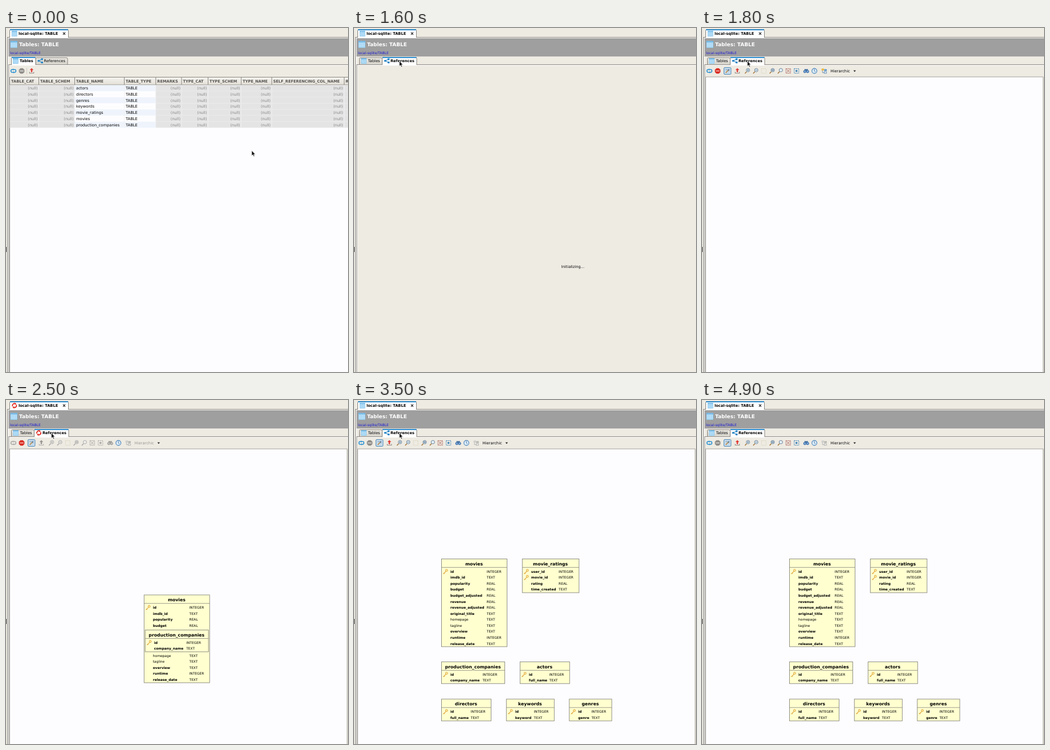
Animation of 600 by 605 pixels, one loop 5400 ms. Source, as an HTML page:

```html
<!DOCTYPE html>
<html lang="en">
<head>
<meta charset="utf-8">
<title>Table references</title>
<style>
  html, body { margin: 0; width: 100%; height: 100%; overflow: hidden; background: #eeebe3; }
  svg { display: block; width: 600px; height: 605px; }
  text { font-family: "DejaVu Sans", sans-serif; font-size: 6.75px; text-rendering: geometricPrecision; white-space: pre; }
  .b { font-weight: bold; font-size: 6.65px; }
  .off { filter: grayscale(1); opacity: .6; }
  text.off { opacity: .36; }
</style>
</head>
<body>
<svg id="stage" viewBox="0 0 600 605" xmlns="http://www.w3.org/2000/svg"></svg>
<script>
const NS = "http://www.w3.org/2000/svg";
const stage = document.getElementById("stage");
const LOOP = 5400, TICK = 100;

function add(parent, tag, attrs = {}, content) {
  const el = document.createElementNS(NS, tag);
  for (const k in attrs) el.setAttribute(k, attrs[k]);
  if (content !== undefined) el.textContent = content;
  parent.appendChild(el);
  return el;
}
const group = (parent, x = 0, y = 0) => add(parent, "g", { transform: `translate(${x} ${y})` });
const rect = (p, x, y, width, height, fill, more) => add(p, "rect", { x, y, width, height, fill, ...more });
const path = (p, d, stroke, width = 1, fill = "none") =>
  add(p, "path", { d, stroke, fill, "stroke-width": width });
const circle = (p, cx, cy, r, fill, stroke = "none", width = 1) =>
  add(p, "circle", { cx, cy, r, fill, stroke, "stroke-width": width });
const label = (p, x, y, str, more) => add(p, "text", { x, y, ...more }, str);
const show = (el, on) => el.setAttribute("display", on ? "inline" : "none");
const dim = (el, on) => el.setAttribute("class", on ? "off" : "");

function gradient(id, from, to) {
  const g = add(stage, "linearGradient", { id, x1: 0, y1: 0, x2: 0, y2: 1 });
  add(g, "stop", { offset: 0, "stop-color": from });
  add(g, "stop", { offset: 1, "stop-color": to });
}
gradient("head", "#f5f3ef", "#e3dfd7");
gradient("idle", "#eceae4", "#d6d3cb");

// Icons, each drawn around its own centre

function gridIcon(p, x, y, s) {
  const g = group(p, x, y), h = s / 2;
  rect(g, -h, -h, s, s, "#c9e8fb", { stroke: "#7dbfe9", "stroke-width": .7 });
  rect(g, -h, -h, s, s * .2, "#6bb5e6");
  for (const k of [-.25, 0, .25])
    path(g, `M${k * s} ${-h}V${h}M${-h} ${k * s + .8}H${h}`, "#93cdf1", .7);
  return g;
}

function linkIcon(p, x, y) {
  const g = group(p, x, y);
  path(g, "M3 -2.8L-3 0L3 2.8", "#2484c6", 1.1);
  circle(g, -2.9, 0, 1.8, "#2484c6");
  rect(g, 1.5, -4.3, 3.4, 3, "#2484c6");
  rect(g, 1.5, 1.3, 3.4, 3, "#2484c6");
  return g;
}

function spinIcon(p, x, y) {
  const g = add(group(p, x, y), "g");
  path(g, "M-3.3 1.4A3.6 3.6 0 0 1 1.4 -3.3M3.3 -1.4A3.6 3.6 0 0 1 -1.4 3.3", "#e0281f", 1.8);
  path(g, "M.8 -5.2L3.6 -2.5L.3 -1.5ZM-.8 5.2L-3.6 2.5L-.3 1.5Z", "none", 0, "#e0281f");
  return g;
}

function refreshIcon(p, x) {
  const g = group(p, x, 75.5);
  path(g, "M-.5 -2.4H-2A2.4 2.4 0 0 0 -2 2.4H-.5M.5 -2.4H2A2.4 2.4 0 0 1 2 2.4H.5", "#2a92d2", 1.5);
  path(g, "M-1 -4.3L1.3 -2.4L-1 -.5ZM1 4.3L-1.3 2.4L1 .5Z", "none", 0, "#2a92d2");
  return g;
}

function stopIcon(p, x, fill) {
  const g = group(p, x, 75.5);
  path(g, "M-2.1 -4.8H2.1L4.8 -2.1V2.1L2.1 4.8H-2.1L-4.8 2.1V-2.1Z", "none", 0, fill);
  rect(g, -3.3, -1, 6.6, 2, "#fff", { opacity: .55 });
  return g;
}

function exportIcon(p, x) {
  const g = group(p, x, 75.5);
  path(g, "M0 -5L3.3 -1.5H1.2V2.3H-1.2V-1.5H-3.3Z", "none", 0, "#e03a34");
  path(g, "M-3.7 1.5V4H3.7V1.5", "#95908c", 1.1);
  return g;
}

function lensIcon(p, x, mark) {
  const g = group(p, x, 75.5);
  path(g, "M-1.2 1.2L-4.2 4.4", "#a5793f", 1.5);
  circle(g, 1.2, -1.4, 3, "#e4f1fa", "#6c8296", 1);
  if (mark) path(g, mark, "#506f8b", .9);
  return g;
}

function fitIcon(p, x, color, inner) {
  const g = group(p, x, 75.5);
  rect(g, -4, -4, 8, 8, "none", { stroke: color, "stroke-width": 1, "stroke-dasharray": "2 1" });
  if (inner) path(g, inner, color, .9, color);
  return g;
}

function glassesIcon(p, x) {
  const g = group(p, x, 75.5);
  path(g, "M-3 -2.5H-1L0 -1L1 -2.5H3", "#33659d", 1.5);
  circle(g, -2.4, 1, 2.2, "#7ca8d7", "#33659d", 1);
  circle(g, 2.4, 1, 2.2, "#7ca8d7", "#33659d", 1);
  return g;
}

function clockIcon(p, x) {
  const g = group(p, x, 75.5);
  circle(g, 0, 0, 4.4, "#d9ebf8", "#4a83b8", 1.1);
  path(g, "M0 -3V0L2 1.8", "#426c94", .9);
  return g;
}

function layoutIcon(p, x) {
  const g = group(p, x, 75.5);
  path(g, "M-3 -2V3H1", "#778da5", .9);
  rect(g, -4.6, -4.2, 4.4, 3.4, "#efb942");
  rect(g, 0, -3, 4.6, 3, "#5796cd");
  rect(g, 0, 1.3, 4, 3, "#e2edf7", { stroke: "#5d87ad", "stroke-width": .8 });
  return g;
}

function toggleIcon(p, x) {
  const g = group(p, x, 75.5);
  rect(g, -6.2, -6, 12.4, 12, "#c5daeb", { rx: 1.5, stroke: "#4f8aba", "stroke-width": 1 });
  path(g, "M-3.2 3.4L1.6 -1.4", "#c08b45", 1.5);
  path(g, "M.2 -2.8L3 0M1.4 -1.4L3.4 -3.4", "#66809a", 1.3);
  path(g, "M-3 -3L-1.4 -1.4", "#7d93a8", 1.1);
}

function keyIcon(p, x, y) {
  const g = group(p, x, y);
  path(g, "M.6 .2L-4 4.5M-2.6 3.2L-1.5 4.3", "#e0a53a", 1.1);
  circle(g, 1.9, -1.7, 1.9, "#fff0a8", "#e0a53a", 1);
}

// Window frame: each tab folder has a border line with a white margin inside it

const LINE = "#85827c";
function folder(p, x, y) {
  rect(p, x, y, 610, 610, "#fff", { stroke: LINE, "stroke-width": 1 });
}

const frame = group(stage);
rect(frame, 0, 0, 600, 605, "#eeebe3");
folder(frame, 2.6, 16.4);
rect(frame, 4.4, 18, 596, 32.4, "#a09f9f");
rect(frame, 4.4, 50.4, 596, 555, "#eeebe3");
rect(frame, 0, 385, 1, 9, "#333");

function tab(p, x1, x2, top, bottom, active) {
  const d = `M${x1} ${bottom}V${top + 2}Q${x1} ${top} ${x1 + 2} ${top}H${x2 - 2}Q${x2} ${top} ${x2} ${top + 2}V${bottom}`;
  path(p, d, LINE, 1, active ? "#fff" : "url(#idle)");
  if (active) path(p, `M${x1 + .5} ${top + .4}H${x2 - .5}`, "#1681cb", 1.8);
}

tab(frame, 6.5, 109.5, 2.8, 17, true);
label(frame, 22, 12.1, "local-sqlite: TABLE", { class: "b" });
path(frame, "M100 7.6L104 11.8M104 7.6L100 11.8", "#222", 1.2);
gridIcon(frame, 13.8, 28.8, 11.5);
label(frame, 23, 31.7, "Tables: TABLE", { fill: "#fff", style: "font:bold 9px 'DejaVu Sans',sans-serif" });
label(frame, 7, 46.3, "local-sqlite/TABLE", { fill: "#1616d6", style: "font-size:6.1px" });
folder(frame, 4.9, 64.4);
rect(frame, 6.4, 66, 594, 540, "#eeebe3");

const titleGrid = gridIcon(stage, 14.7, 9.8, 9);
const titleSpin = spinIcon(stage, 14.8, 9.8);

// Tables page

const tablesPage = group(stage);
tab(tablesPage, 52, 108, 52.3, 64, false);
tab(tablesPage, 9.5, 52, 51.5, 65, true);
gridIcon(tablesPage, 16.8, 58, 9);
label(tablesPage, 24, 60.1, "Tables", { class: "b" });
linkIcon(tablesPage, 60, 57.8);
label(tablesPage, 66.5, 60.1, "References");
refreshIcon(tablesPage, 13);
stopIcon(tablesPage, 27.5, "#8f8c88");
path(tablesPage, "M36.5 70V81", "#cfcbc3", 1);
exportIcon(tablesPage, 45);

rect(tablesPage, 6, 86, 594, 519, "#fdfdff");
rect(tablesPage, 6, 86.5, 594, 13.5, "url(#head)");
path(tablesPage, "M6.5 605V86.5H600M6.5 100H600", "#8b8882", 1);

const columns = [
  [6.5, "TABLE_CAT"], [57.5, "TABLE_SCHEM"], [120.5, "TABLE_NAME"], [207.5, "TABLE_TYPE"],
  [262.8, "REMARKS"], [308, "TYPE_CAT"], [354.5, "TYPE_SCHEM"], [412.7, "TYPE_NAME"],
  [466.2, "SELF_REFERENCING_COL_NAME"], [593.3, "REF_GENERATION"]
];
const names = ["actors", "directors", "genres", "keywords", "movie_ratings", "movies", "production_companies"];
const ROW = 10.72;

columns.forEach(([x, title], c) => {
  const end = c < 9 ? columns[c + 1][0] : 640;
  const filled = c === 2 || c === 3;
  names.forEach((name, r) => {
    const y = 100.4 + r * ROW, base = y + 7.8;
    rect(tablesPage, x, y, end - x, ROW, filled ? (r % 2 ? "#fdfdff" : "#eff4fc") : "#e5e4e5");
    if (filled) label(tablesPage, x + 2.5, base, c === 2 ? name : "TABLE");
    else {
      path(tablesPage, `M${x} ${y + ROW - .3}H${end}`, "#efeeef", .6);
      label(tablesPage, end - 2, base, "(null)", { fill: "#858585", "text-anchor": "end", style: "font-size:6.6px" });
    }
  });
  if (c) {
    path(tablesPage, `M${x} 87V100`, "#8b8882", 1);
    path(tablesPage, `M${x} 100.5V175.4`, "#efeff2", .7);
  }
  label(tablesPage, x + 2.5, 95.8, title, { class: "b", fill: "#55534f" });
});

// References page

const refsPage = group(stage);
tab(refsPage, 9.5, 49.5, 52.3, 64, false);
tab(refsPage, 49.5, 110, 51.5, 65, true);
gridIcon(refsPage, 17.2, 58, 9);
label(refsPage, 24.6, 60.1, "Tables");
label(refsPage, 64, 60.1, "References", { class: "b" });
const refsLink = linkIcon(refsPage, 57.5, 57.8);
const refsSpin = spinIcon(refsPage, 57.5, 57.8);
const initText = label(refsPage, 363.7, 421.7, "Initializing...", { style: "font-size:6.65px" });

const editor = group(refsPage);
rect(editor, 6.5, 86, 592, 530, "#fdfdff", { stroke: "#a5a29b", "stroke-width": 1 });
const stopRed = stopIcon(editor, 27.5, "#d92b22");
const stopGray = stopIcon(editor, 27.5, "#8f8c88");
toggleIcon(editor, 44.7);
fitIcon(editor, 108.3, "#dad5bd");
clockIcon(editor, 197.2);
path(editor, "M265.6 74.5H270L267.8 77.2Z", "none", 0, "#222");

const tools = [
  refreshIcon(editor, 13), exportIcon(editor, 62),
  lensIcon(editor, 79.5, "M-.3 -1.4H2.7M1.2 -2.9V.1"), lensIcon(editor, 94, "M-.3 -1.4H2.7"),
  lensIcon(editor, 122.8, "M0 -2.3H2.4V-.5H0Z"), lensIcon(editor, 137.2),
  fitIcon(editor, 151.3, "#a85b50", "M-2.5 -2.5L2.5 2.5M2.5 -2.5L-2.5 2.5"),
  fitIcon(editor, 165.8, "#3e83b8", "M-1.2 -1.2H1.2V1.2H-1.2Z"),
  glassesIcon(editor, 182.8), label(editor, 225.5, 77.7, "Hierarchic")
];
const layoutTool = layoutIcon(editor, 214.3);

// Diagram: tables spread out from one common centre; "*" marks a key, "-" a nullable column

const HUB = { x: 302.5, y: 422 };
const entities = [
  ["actors", 291.3, 460.5, 87, "*id:INTEGER full_name:TEXT"],
  ["directors", 153.5, 526, 87, "*id:INTEGER full_name:TEXT"],
  ["genres", 377.7, 526, 74.5, "*id:INTEGER genre:TEXT"],
  ["keywords", 267.3, 526, 84, "*id:INTEGER keyword:TEXT"],
  ["movie_ratings", 295.3, 279.5, 99.5, "*user_id:INTEGER *movie_id:INTEGER rating:REAL time_created:TEXT"],
  ["movies", 153.5, 279.5, 115, "*id:INTEGER imdb_id:TEXT popularity:REAL budget:REAL budget_adjusted:REAL " +
    "revenue:REAL revenue_adjusted:REAL original_title:TEXT -homepage:TEXT -tagline:TEXT " +
    "overview:TEXT runtime:INTEGER release_date:TEXT"],
  ["production_companies", 153.5, 460.5, 111, "*id:INTEGER company_name:TEXT", 72]
];

const diagram = group(editor);
const boxes = entities.map(([name, x, y, w, spec, typeX = w - 35.7]) => {
  const cols = spec.split(" ");
  const h = 17.2 + cols.length * 10.55;
  const g = group(diagram);
  rect(g, 0, 0, w, h, "#ffffd0", { stroke: "#85857d", "stroke-width": .9 });
  path(g, `M0 14.9H${w}`, "#85857d", .8);
  label(g, w / 2 - .4, 11, name, { "text-anchor": "middle", style: "font-size:7.72px;font-weight:bold" });
  cols.forEach((col, i) => {
    const [id, type] = col.split(":"), base = 24.2 + i * 10.57;
    const weight = id[0] === "-" ? "normal" : "bold";
    if (id[0] === "*") keyIcon(g, 7, base - 2.4);
    label(g, 15.5, base, id.replace(/^[*-]/, ""), { style: `font-size:5.95px;font-weight:${weight}` });
    label(g, typeX, base, type, { style: "font-size:5.9px" });
  });
  return { g, x, y, w, h };
});

function spread(p) {
  for (const { g, x, y, w, h } of boxes) {
    const left = HUB.x - w / 2, top = HUB.y - h / 2;
    g.setAttribute("transform", `translate(${left + (x - left) * p} ${top + (y - top) * p})`);
  }
}

// Pointer

const pointer = group(stage);
path(pointer, "M0 0V9.2L2.1 7.3L3.6 10.6L5.2 9.9L3.7 6.7H6.5Z", "#fff", .7, "#111");

const clamp = v => Math.max(0, Math.min(1, v));
const ramp = (t, from, to) => clamp((t - from) / (to - from));
const smooth = v => v * v * (3 - 2 * v);
const mix = (a, b, k) => a + (b - a) * k;

function pointerAt(t) {
  if (t < 3900) {
    const go = smooth(ramp(t, 0, 600)), settle = smooth(ramp(t, 600, 1000));
    return [mix(431, 81.5, go) - 2 * settle, mix(215.5, 60, go) - 2 * settle];
  }
  const leave = ramp(t, 3900, 4500);
  return [mix(79.5, 604, leave * leave), mix(58, 47, leave)];
}

function update(now) {
  const t = Math.floor(now % LOOP / TICK) * TICK;
  const onRefs = t >= 1600, ready = t >= 1800;
  const busy = t >= 1900 && t < 2900, done = t >= 2900;

  show(tablesPage, !onRefs);
  show(refsPage, onRefs);
  show(initText, !ready);
  show(editor, ready);
  show(titleGrid, !busy);
  show(titleSpin, busy);
  show(refsLink, !busy);
  show(refsSpin, busy);
  show(stopRed, !done);
  show(stopGray, done);
  tools.forEach(tool => dim(tool, busy));
  dim(layoutTool, busy || done);

  const turn = `rotate(${(t - 2500) / TICK * 45})`;
  titleSpin.setAttribute("transform", turn);
  refsSpin.setAttribute("transform", turn);

  show(diagram, t >= 2500);
  spread(clamp(.03 + (t - 2500) / 100 * .4675));

  const [x, y] = pointerAt(t);
  pointer.setAttribute("transform", `translate(${x} ${y})`);
  show(pointer, t < 4500);
}

function tick() {
  update(performance.now());
  requestAnimationFrame(tick);
}
tick();
</script>
</body>
</html>
```
